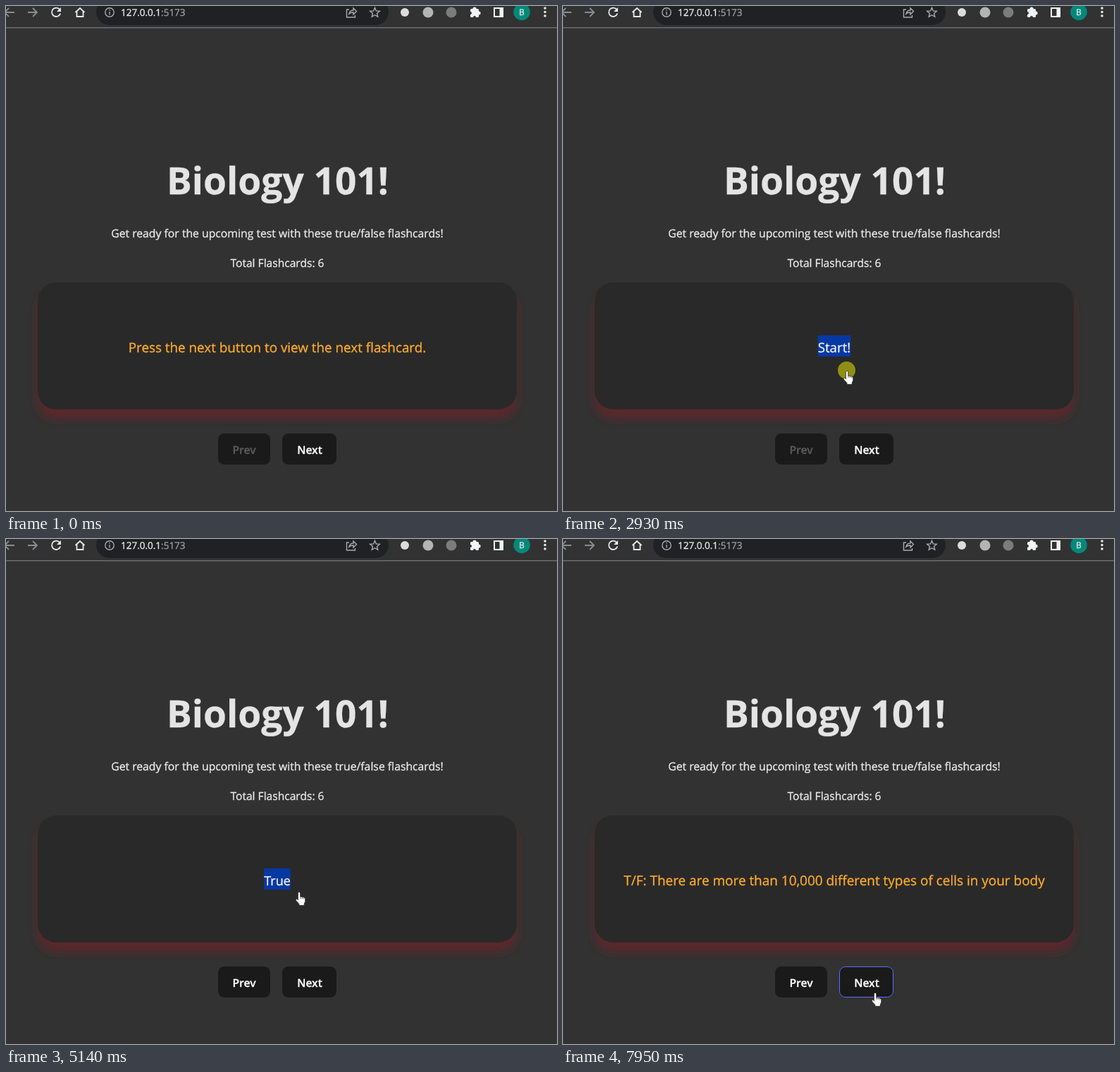
An HTML page for the animation above (8000 ms loop, 782 by 716 pixels).

```html
<!DOCTYPE html>
<html lang="en">
<head>
<meta charset="utf-8">
<title>Flashcards</title>
<style>
  html, body { margin: 0; width: 100%; height: 100%; overflow: hidden; background: #323232; }
  svg { display: block; width: 782px; height: 716px; }
  text {
    font-family: "Open Sans", "Noto Sans", sans-serif; text-rendering: geometricPrecision;
    color: #ececec; fill: currentColor; stroke: currentColor; stroke-width: .3;
  }
  .mid { text-anchor: middle; }
  .btn { font-weight: 600; font-size: 15.6px; color: #fff; }
  .line { fill: none; stroke: #e8eaed; stroke-width: 1.8; }
  .thin { fill: none; stroke: #a8abaf; stroke-width: 1.4; }
</style>
</head>
<body>
<svg viewBox="0 0 782 716">
  <defs>
    <filter id="blur" x="-10%" y="-30%" width="120%" height="160%">
      <feGaussianBlur stdDeviation="6.5"/>
    </filter>
  </defs>
  <rect width="782" height="716" fill="#323232"/>

  <!-- browser toolbar -->
  <rect y="30" width="782" height="1.5" fill="#6b6c6e"/>
  <rect x="128" y="-10" width="415" height="37" rx="18.5" fill="#202124"/>
  <path class="line" style="stroke:#8b8d90" d="M12 9H-2M4 3L-2 9l6 6M31 9H44M38 3l6 6l-6 6"/>
  <path class="line" d="M76.5 5.5A6.2 6.2 0 1 0 77.2 10.5"/>
  <path d="M78 2v6h-6z" fill="#e8eaed"/>
  <path class="line" d="M98.5 9L105 3l6.5 6M100.5 8v7h9V8"/>
  <circle class="thin" cx="147" cy="9" r="6.2"/>
  <path class="thin" d="M147 8v4.5M147 5v1.6"/>
  <path class="thin" d="M487 5h-3.5v11h12v-3M487 11q1-5 6-5V3l4.5 4.5L493 12V9q-4 0-6 2z"/>
  <polygon id="star" class="thin"/>
  <text x="163" y="14" font-size="13.5">127.0.0.1<tspan style="color:#9aa0a6">:5173</tspan></text>
  <circle cx="566" cy="9" r="6" fill="#dcdcdc"/>
  <circle cx="599" cy="9" r="7.5" fill="#b4b4b4"/>
  <circle cx="632" cy="9" r="7.5" fill="#7c7c7c"/>
  <g fill="#f1f3f4">
    <rect x="659" y="4" width="12" height="12" rx="1.5"/>
    <circle cx="665" cy="4" r="2.6"/><circle cx="671" cy="10" r="2.6"/>
    <path fill-rule="evenodd" d="M692 2h14v14h-14zM694 4v10h6.5V4z"/>
  </g>
  <g fill="#323232"><circle cx="659" cy="10" r="2"/><circle cx="665" cy="16" r="2"/></g>
  <circle cx="732" cy="8.5" r="11.8" fill="#00897b"/>
  <text class="mid" x="732" y="13" font-size="12">B</text>
  <path d="M765 3v11.5" stroke="#e8eaed" stroke-width="3.6" stroke-linecap="round" stroke-dasharray="0 5.5"/>

  <!-- page -->
  <text class="mid" x="385.5" y="266.5" font-size="53.3" font-weight="700" style="color:#e4e4e4">Biology 101!</text>
  <text class="mid" x="385" y="328" font-size="15.75">Get ready for the upcoming test with these true/false flashcards!</text>
  <text class="mid" x="385" y="370" font-size="15.6">Total Flashcards: 6</text>
  <rect x="45" y="405" width="680" height="180" rx="26" fill="#5c2829" filter="url(#blur)"/>
  <rect x="45" y="392" width="680" height="180" rx="26" fill="#292929"/>
  <g id="card"></g>

  <rect x="301" y="606" width="74" height="44" rx="8.8" fill="#1a1a1a"/>
  <text id="prev" class="mid btn" x="338" y="635">Prev</text>
  <rect x="392" y="606" width="77" height="44" rx="8.8" fill="#1a1a1a"/>
  <rect id="ring" x="392.5" y="606.5" width="76" height="43" rx="8.3" fill="none" stroke="#646cff"/>
  <text class="mid btn" x="431" y="635">Next</text>

  <!-- pointer -->
  <g id="pointer">
    <circle id="press" cx="4.5" cy="-.5" r="12.5" fill="#ff0" fill-opacity=".48"/>
    <g id="hand" stroke="#222" stroke-width=".7">
      <path fill="#fff" d="M3.5 12V2a1.6 1.6 0 0 1 3.2 0v5l5 1q2 .5 2 2.5v3.5l-1.5 3v2.5H5v-2L.8 13q-1-2 .5-2.6T3.5 12z"/>
      <path d="M6.9 7v3M9.3 7.8v2.4M11.6 8.4v2.2"/>
    </g>
    <path id="arrow" d="M.3.3V14l3-2.7 2.2 5 2.3-1-2.2-4.8H10z" fill="#fff" stroke="#111" stroke-width=".8"/>
  </g>
</svg>
<script>
const LOOP = 8000, MID = 385, LINE = 30, PRESS = 140, FADE = 250;
const $ = id => document.getElementById(id);

const texts = {
  hint: { size: 18.85, lines: ["Press the next button to view the next flashcard."] },
  start: { size: 18.7, lines: ["Start!"] },
  cell: { size: 18.5, lines: ["T/F: Mitochondria are known as the powerhouse of the cell because",
                              "they produce most of its energy"] },
  yes: { size: 18, lines: ["True"] },
  types: { size: 18.95, lines: ["T/F: There are more than 10,000 different types of cells in your body"] }
};

const scenes = [
  { at: 0, text: "hint" },
  { at: 2090, text: "start" },
  { at: 2670, text: "hint" },
  { at: 2810, text: "hint", selected: true },
  { at: 2930, text: "start", selected: true },
  { at: 4400, text: "cell", selected: true },
  { at: 5050, text: "yes", selected: true },
  { at: 6270, text: "yes" },
  { at: 7410, text: "cell" },
  { at: 7950, text: "types" }
];
const presses = [2530, 2810, 2920, 4270, 4930, 6270, 7300, 7800];

// each move: start, end, and where the pointer comes to rest
const enter = { at: 200, x: 636, y: 684 };
const moves = [
  [200, 470, 435, 538],
  [960, 1360, 408, 648],
  [1690, 1840, 398, 517],
  [3680, 3930, 419, 624],
  [4560, 4880, 411, 500],
  [5340, 5560, 425, 473],
  [5560, 6140, 642, 657],
  [6190, 6260, 638, 647],
  [6560, 7140, 425, 489],
  [7540, 7760, 438, 643]
];

function pointAt(t) {
  let { x, y } = enter;
  for (const [start, end, toX, toY] of moves) {
    const p = Math.min(1, Math.max(0, (t - start) / (end - start)));
    const s = p * p * (3 - 2 * p);
    x += (toX - x) * s;
    y += (toY - y) * s;
  }
  return { x, y };
}

const inside = (p, l, t, r, b) => p.x + 4 >= l && p.x + 4 <= r && p.y >= t && p.y <= b;
const overCard = p => inside(p, 45, 392, 725, 572);
const overNext = p => inside(p, 392, 606, 469, 650);

// border strength: the share of the last FADE ms spent over the button
function glow(t) {
  const steps = 25;
  let hits = 0;
  for (let i = 0; i < steps; i++) hits += overNext(pointAt(t - i * FADE / steps));
  return hits / steps;
}

function make(tag, attrs) {
  const el = document.createElementNS("http://www.w3.org/2000/svg", tag);
  for (const key in attrs) el.setAttribute(key, attrs[key]);
  $("card").append(el);
  return el;
}

let shown = null;
function showCard(scene) {
  if (scene === shown) return;
  shown = scene;
  $("card").replaceChildren();
  const { size, lines } = texts[scene.text];
  const top = 482 - LINE * lines.length / 2;
  lines.forEach((line, i) => {
    const y = top + i * LINE;
    const box = make("rect", { y, height: LINE, fill: scene.selected ? "#0638a4" : "none" });
    const text = make("text", { class: "mid", x: MID, y: y + 23.5, "font-size": size,
                                style: `color:${scene.selected ? "#f4f4f4" : "#ffac2c"}` });
    text.textContent = line;
    const width = text.getComputedTextLength();
    const space = i < lines.length - 1 ? 5 : 0;
    box.setAttribute("x", MID - width / 2);
    box.setAttribute("width", width + space);
  });
}

const show = (id, on) => { $(id).style.display = on ? "" : "none"; };

function draw(t) {
  showCard(scenes.filter(s => s.at <= t).pop());
  $("prev").style.color = t < 4400 ? "#5a5a5a" : "#fff";
  $("ring").setAttribute("stroke-opacity", glow(t));

  const p = pointAt(t), link = overCard(p) || overNext(p);
  $("pointer").setAttribute("transform", `translate(${p.x} ${p.y})`);
  show("pointer", t >= enter.at);
  show("hand", link);
  show("arrow", !link);
  show("press", presses.some(at => t >= at && t < at + PRESS));
}

const star = Array.from({ length: 10 }, (_, i) => {
  const r = i % 2 ? 3.2 : 7.2, a = i * Math.PI / 5;
  return `${523.5 + r * Math.sin(a)},${9.5 - r * Math.cos(a)}`;
});
$("star").setAttribute("points", star.join(" "));

const begin = performance.now();
function tick() {
  draw((performance.now() - begin) % LOOP);
  requestAnimationFrame(tick);
}
tick();
</script>
</body>
</html>
```
